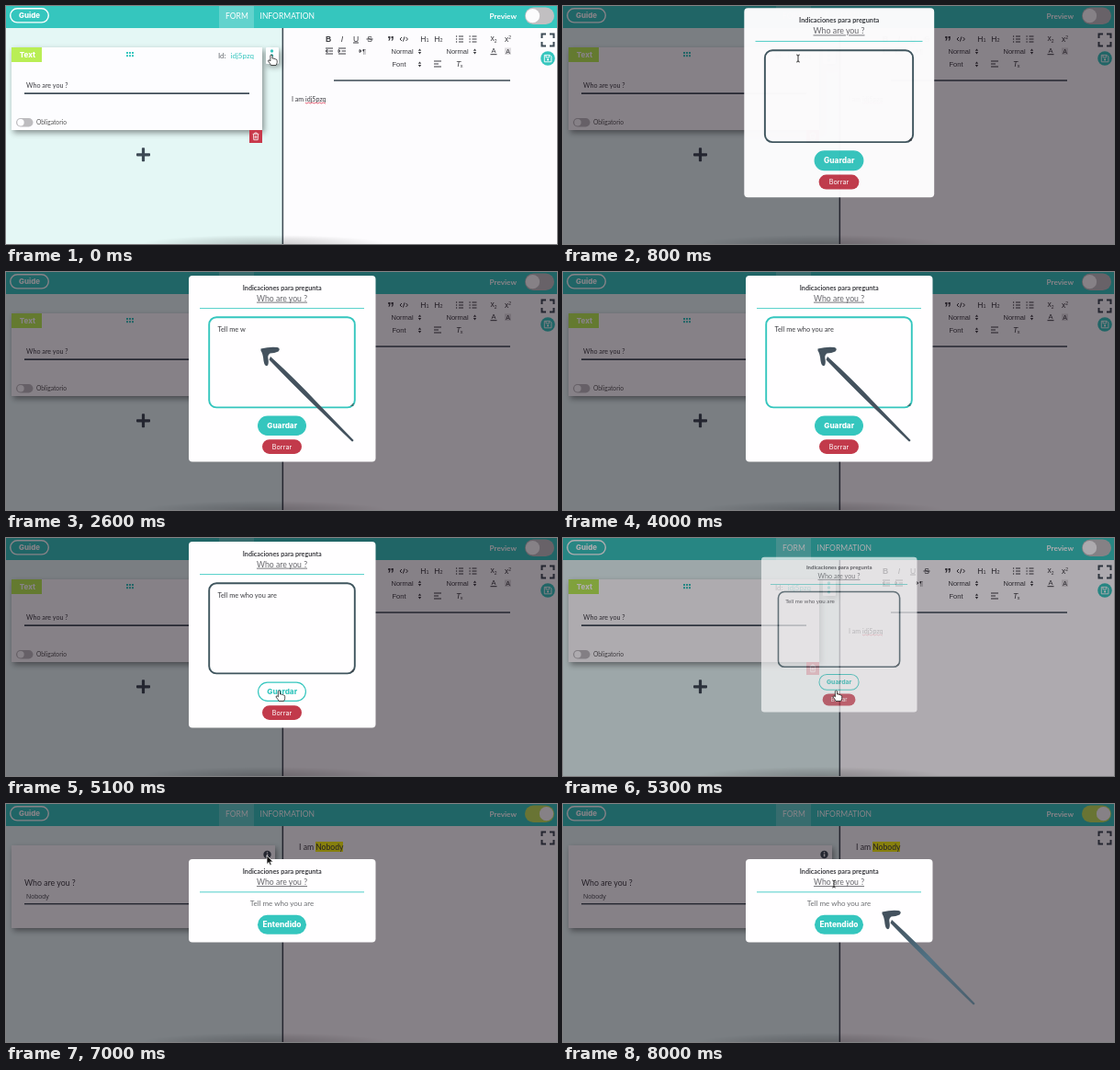
An HTML page for the animation above (8.1 s loop, 600 by 259 pixels).

```html
<!DOCTYPE html>
<html lang="en">
<head>
<meta charset="utf-8">
<title>Form editor hints</title>
<style>
html, body { margin: 0; width: 100%; height: 100%; overflow: hidden; background: #fdfcfe; }
svg { display: block; width: 100%; height: 100%; font-family: Lato, sans-serif; }
.card { fill: #fdfdff; filter: drop-shadow(2px 3px 3px rgba(0,0,0,.42)); }
.heavy { font-family: Inter, sans-serif; font-weight: 800; }
.plain { font-family: "Liberation Sans", Arial, sans-serif; }
.inter { font-family: Inter, sans-serif; }
.mid { text-anchor: middle; }
.ul { text-decoration: underline; text-decoration-thickness: .5px; }
.line { fill: none; stroke: #3b3b40; stroke-width: 1; }
</style>
</head>
<body>
<svg id="stage" viewBox="0 0 600 259" preserveAspectRatio="none"></svg>
<script>
const LOOP = 8100, STEP = 100;
const TEAL = '#35c6be', INK = '#3d4a55', DARK = '#3b3b40', RED = '#c23a4b';
const ANSWER = 'Tell me who you are';

const text = (x, y, size, str, fill = DARK, cls = '', extra = '') =>
  `<text x="${x}" y="${y}" font-size="${size}" fill="${fill}" class="${cls}" ${extra}>${str}</text>`;
const rect = (x, y, w, h, fill, r = 0, extra = '') =>
  `<rect x="${x}" y="${y}" width="${w}" height="${h}" rx="${r}" fill="${fill}" ${extra}/>`;
const dot = (x, y, r, fill, extra = '') =>
  `<circle cx="${x}" cy="${y}" r="${r}" fill="${fill}" ${extra}/>`;
const path = (d, extra = '') => `<path d="${d}" class="line" ${extra}/>`;
const group = (id, body) => `<g id="${id}">${body}</g>`;

const rows = (x, y, widths) =>
  widths.map((w, i) => path(`M${x} ${y + i * 3}h${w}`, 'stroke-width=".9"')).join('');
const listIcon = (x) => rows(x + 3, 33, [5, 5, 5]) +
  [33, 36, 39].map(y => dot(x + .6, y, .7, DARK)).join('');
const indentIcon = (x, side) => rows(x, 46, [8]) + rows(x + 3.5, 49, [4.5]) + rows(x, 52, [8]) +
  path(side > 0 ? `M${x} 47.5l2 1.5l-2 1.5z` : `M${x + 2} 47.5l-2 1.5l2 1.5z`, 'stroke-width=".6"');
const picker = (x, y, label, ax) => text(x, y, 7.5, label, DARK, 'plain') +
  `<path d="M${ax - 1.7} ${y - 3.3}h3.4l-1.7 -2.3zM${ax - 1.7} ${y - 1.9}h3.4l-1.7 2.3z" fill="${DARK}"/>`;

function toolbar() {
  const t = (x, y, s, extra = '', size = 8.6) => text(x, y, size, s, DARK, 'plain mid', extra);
  return t(351, 39, 'B', 'font-weight="700"') + t(366, 39, 'I', 'font-style="italic"') +
    t(381, 38.5, 'U') + path('M378 40h6', 'stroke-width=".8"') +
    t(396, 39, 'S') + path('M392.5 36h7', 'stroke-width=".7"') +
    t(419, 45, '”', 'font-weight="700"', 16) +
    path('M431 34l-2 2l2 2M435.5 34l2 2l-2 2M434 33.4l-1.6 5.2', 'stroke-width=".8"') +
    t(456, 39, 'H<tspan font-size="5.5">1</tspan>') + t(471, 39, 'H<tspan font-size="5.5">2</tspan>') +
    listIcon(490) + listIcon(504.5) +
    t(531, 38, 'x<tspan font-size="5" dy="1.5">2</tspan>') + t(546.5, 39, 'x<tspan font-size="5" dy="-3">2</tspan>') +
    indentIcon(348, -1) + indentIcon(362, 1) +
    path('M385 47.5l2 1.5l-2 1.5z', 'stroke-width=".6"') + t(390, 52, '¶', '', 7.5) +
    picker(419.5, 52, 'Normal', 450.5) + picker(479.5, 52, 'Normal', 510.5) +
    t(531, 51, 'A', '', 7.5) + path('M527.5 52.7h7') +
    rect(543, 45.5, 7, 7.5, '#dfdde0') + t(546.5, 52, 'A', '', 7) +
    picker(420.5, 66, 'Font', 450.5) +
    rows(466, 60, [8, 5, 8]) +
    t(492.5, 66, 'T', 'font-style="italic"') + t(496, 67, 'x', '', 5.5);
}

function editor() {
  const handle = [0, 1, 2, 3, 4, 5].map(i =>
    rect(131 + i % 3 * 3, 50 + (i > 2 ? 3.2 : 0), 2, 2, TEAL)).join('');
  let wave = 'M326 105';
  for (let i = 0; i < 11; i++) wave += `l1 ${i % 2 ? -1 : 1}l1 0`;
  return rect(6, 45, 273, 90, '#fff', 0, 'class="card"') +
    rect(6, 45, 33, 16, '#b9ee55') + text(23.5, 56, 8, 'Text', '#fff', 'heavy mid') + handle +
    text(231, 57, 8, 'Id:', '#666b70') + text(244.5, 57, 8, 'idj5pzq', TEAL) +
    rect(283, 45, 14, 18, '#fbfdfd', 1, 'class="card"') +
    [49, 54, 59].map(y => dot(289.5, y, 1.7, TEAL)).join('') +
    text(22, 89, 7.2, 'Who are you ?') + rect(20, 94.3, 245, 1.7, INK) +
    rect(11, 122, 18.5, 9.5, '#bdbcbf', 4.75) + dot(16, 126.7, 3.7, '#fdfdff') +
    text(33, 129, 6.7, 'Obligatorio', '#555') +
    rect(265, 135, 14, 14, '#c8394b') +
    `<path d="M268.7 139.3h6.6M270.8 139v-1h2.4v1M269.4 139.5l.4 6.2h4.4l.4 -6.2M271.2 141v3.3M272.8 141v3.3" fill="none" stroke="#fff" stroke-width=".8"/>` +
    rect(142, 160.2, 15, 3.2, INK, .8) + rect(147.9, 154.3, 3.2, 15, INK, .8) +
    toolbar() + rect(357, 80.3, 192, 1.5, INK) +
    text(311, 103.5, 7.1, 'I am idj5pzq') + `<path d="${wave}" fill="none" stroke="#e0405a" stroke-width=".8"/>` +
    dot(590, 57, 7.8, TEAL) +
    `<path d="M586.3 53.4h6l1.6 1.6v5.8h-7.6zM588 53.5v2.4h3.6v-2.4" fill="none" stroke="#fff" stroke-width=".9"/>` +
    dot(590.1, 58.4, 1.1, '#fff');
}

function preview() {
  return rect(6, 45, 287, 90, '#fff', 0, 'class="card"') +
    dot(284.5, 55, 4.2, INK) + rect(283.8, 54.3, 1.5, 3, '#fff') + dot(284.5, 52.8, .8, '#fff') +
    text(20, 89, 8.8, 'Who are you ?') + text(22, 102.5, 7.2, 'Nobody', '#55585c', 'plain') +
    rect(20, 108, 259, 1.4, INK) +
    rect(337, 41, 30, 11, '#fdf90f') + text(319, 50, 8.7, 'I am') + text(337.2, 50, 8.6, 'Nobody');
}

const heading = (y) =>
  text(300.7, y, 7.2, 'Indicaciones para pregunta', DARK, 'mid', 'font-weight="700"') +
  text(300.5, y + 12, 8.7, 'Who are you ?', '#66666b', 'mid ul') +
  rect(211, y + 19.3, 179, 1.1, '#5fd3cd');

const askBox = () => rect(199, 4, 203.5, 202.5, '#fffeff', 4) + heading(19.7) +
  `<rect id="field" x="221.2" y="49.2" width="158.6" height="98.2" rx="8" fill="#fffeff" stroke-width="1.9"/>` +
  path('M375.5 146l3 -3M377.3 146l1.2 -1.2', 'stroke-width=".5"') +
  `<text id="typed" x="230.5" y="64.7" font-size="7.4" fill="${DARK}"></text>` +
  `<rect id="save" x="274.6" y="157.1" width="51.8" height="20.3" rx="10.15" stroke="${TEAL}" stroke-width="1.2"/>` +
  `<text id="saveText" x="300.7" y="170.1" font-size="8.2" class="heavy mid">Guardar</text>` +
  rect(279, 182.3, 43, 15.6, RED, 7.8) + text(300.5, 192.7, 7.2, 'Borrar', '#fff', 'inter mid');

const tellBox = () => rect(199, 60, 203.5, 90.5, '#fffeff', 4) + heading(76) +
  text(300.5, 111, 8, ANSWER, '#6c6e72', 'mid') +
  rect(274, 120.8, 53, 21, TEAL, 10.5) + text(300.5, 134.2, 8.4, 'Entendido', '#fff', 'heavy mid');

// Brush arrow with its tip at the local origin and its tail at (100, 100)
const arrow = (id, fill) => `<g id="${id}">
  <path d="M10.5 8.5Q38 33.5 62 59.2L101 99.6Q100.6 101.4 99 100.8L58.5 61.8Q32 36 9 12Z" fill="${fill}"/>
  <path d="M0 0Q10 -2.5 18 -1.5Q22 0 19 3Q15 5 10 5Q7 7 8 11Q9 17 7 18.5Q4 19.5 3 13Q2.5 6 0 2Z" fill="#44525e"/></g>`;

const corner = (x, y, a, b) => `M${x} ${y + 4.5 * b}v${-4.5 * b}h${4.5 * a}`;

document.getElementById('stage').innerHTML = `
<defs>
  <radialGradient id="dock" cx=".5" cy="1" r=".5" gradientTransform="translate(0 -1) scale(1 2)">
    <stop offset="0" stop-opacity=".2"/><stop offset=".6" stop-opacity=".09"/><stop offset="1" stop-opacity="0"/>
  </radialGradient>
  <linearGradient id="steel" x1="0" y1="0" x2="1" y2="1">
    <stop offset="0" stop-color="#44525e"/><stop offset=".45" stop-color="#507183"/><stop offset="1" stop-color="#4b5f6d"/>
  </linearGradient>
</defs>` +
rect(0, 0, 600, 259, '#fdfcfe') + rect(0, 24, 301, 235, '#e4f7f5') +
rect(0, 0, 600, 24, TEAL) + rect(232, 0, 38, 24, '#62d3cd') +
rect(4.7, 2.7, 41.6, 15.2, 'none', 7.6, 'stroke="#fff" stroke-width="1.4"') +
text(25.5, 13.2, 7.9, 'Guide', '#fff', 'heavy mid') +
text(239, 13.7, 8.5, 'FORM', '#fff') + text(276.5, 13.7, 8.5, 'INFORMATION', '#fff') +
text(526.5, 13.7, 8.2, 'Preview', '#fff', '', 'font-weight="700"') +
rect(565, 1.5, 32, 18.5, '#c1bfc1', 9.25, 'id="track"') + dot(573.5, 10.7, 7.6, '#fcfcfd', 'id="knob"') +
rect(300.6, 24, 1.5, 235, '#3b4750') +
group('editor', editor()) + group('preview', preview()) +
path(corner(583.5, 30.5, 1, 1) + corner(596.5, 30.5, -1, 1) + corner(583.5, 43.5, 1, -1) + corner(596.5, 43.5, -1, -1),
  `style="stroke:${INK};stroke-width:2"`) +
rect(148, 249, 266, 10, 'url(#dock)') +
rect(0, 0, 600, 259, '#0b020c', 0, 'id="shade"') +
group('ask', askBox()) + group('tell', tellBox()) +
arrow('arrowA', '#44525e') + arrow('arrowB', 'url(#steel)') +
`<g id="hand"><path d="M-1.1 .2Q0 -1 1 .2V3.6Q2.2 3 3 4Q4.2 3.6 4.8 4.6Q6.2 4.4 6.2 6V8Q6 9.5 5 11H-.4Q-1.4 9-3.4 6.6Q-3.6 5-2.2 5.4L-1.1 6.4Z" fill="#fff" stroke="#222" stroke-width=".8"/></g>
<g id="point"><path d="M0 0V9.5L2.2 7.5L3.6 10.8L5.2 10.1L3.8 6.9H6.8Z" fill="#111" stroke="#fff" stroke-width=".7"/></g>
<g id="beam"><path d="M-1.8 -4Q0 -4 0 -2.7Q0 -4 1.8 -4M0 -3V3M-1.8 4Q0 4 0 2.7Q0 4 1.8 4" fill="none" stroke="#222" stroke-width=".9"/></g>`;

const el = {};
document.querySelectorAll('[id]').forEach(e => el[e.id] = e);

const clamp = v => Math.max(0, Math.min(1, v));
const span = (t, a, b) => clamp((t - a) / (b - a));
const ease = p => p * p * (3 - 2 * p);
const show = (e, on) => e.setAttribute('display', on ? 'inline' : 'none');
const set = (e, attrs) => { for (const k in attrs) e.setAttribute(k, attrs[k]); };

// Piecewise track of [time, value, value...] points
function track(points, t, curve = p => p) {
  let i = 0;
  while (i < points.length - 2 && t >= points[i + 1][0]) i++;
  const a = points[i], b = points[i + 1], p = curve(span(t, a[0], b[0]));
  return a.slice(1).map((v, k) => v + (b[k + 1] - v) * p);
}

const POP = [[0, .7], [.45, 1.05], [.8, .95], [1, 1]];
const MOVES = [[0, 289, 53.5], [600, 289, 53.5], [800, 256, 57], [1000, 254, 60], [1300, 248, 66],
  [4400, 262, 80], [4900, 297.5, 166.5], [5300, 297.5, 166.5], [5800, 587.5, 10.5],
  [6300, 587.5, 10.5], [6600, 284, 56], [7100, 284, 56], [7500, 295, 87], [8100, 295, 87]];
const CURSORS = [[0, 'hand'], [700, 'beam'], [1600, ''], [4300, 'beam'], [4700, 'hand'],
  [5350, 'point'], [5750, 'hand'], [6350, 'point'], [7200, 'beam']];

function modal(box, t, open, close) {
  const on = t >= open && t < close + 150;
  show(box, on);
  if (!on) return 0;
  const out = span(t, close, close + 150);
  const s = track(POP, span(t, open, open + 300))[0] * (1 - out / 2);
  set(box, {
    transform: `translate(300.7 105) scale(${s}) translate(-300.7 -105)`,
    opacity: (t < open + 300 ? .97 : 1) * (1 - out)
  });
  return span(t, open, open + 100) * (1 - out);
}

// Grows from the tail until the tip reaches (x, y)
function placeArrow(e, x, y, grow, alpha = 1) {
  const shift = 100 * (1 - grow);
  show(e, grow * alpha > 0);
  set(e, { transform: `translate(${x + shift} ${y + shift}) scale(${grow})`, opacity: alpha });
}

function draw(t) {
  const live = t >= 5900, slide = ease(span(t, 5800, 6000));
  show(el.editor, !live);
  show(el.preview, live);
  set(el.track, { fill: slide > .4 ? '#c3e35c' : '#c1bfc1' });
  set(el.knob, { cx: 573.5 + 15 * slide });

  const dim = Math.max(modal(el.ask, t, 630, 5250), modal(el.tell, t, 6690, LOOP));
  set(el.shade, { opacity: .49 * dim });

  const hover = t >= 4850;
  set(el.field, { stroke: t >= 1300 && !hover ? TEAL : '#3f555e' });
  set(el.save, { fill: hover ? '#fffeff' : TEAL });
  set(el.saveText, { fill: hover ? TEAL : '#fff' });
  el.typed.textContent = ANSWER.slice(0, Math.max(0, Math.floor((t - 1500) / 120)));

  placeArrow(el.arrowA, 277.5, 83.5, ease(span(t, 1900, 2300)), 1 - span(t, 4200, 4500));
  placeArrow(el.arrowB, 347.5, 117.5, ease(span(t, 7500, 7900)));

  const kind = CURSORS.filter(c => c[0] <= t).pop()[1];
  const [x, y] = track(MOVES, t, ease);
  for (const id of ['hand', 'point', 'beam']) {
    show(el[id], id === kind);
    set(el[id], { transform: `translate(${x} ${y})` });
  }
}

const start = performance.now();
function frame() {
  const t = (performance.now() - start) % LOOP;
  draw(Math.floor(t / STEP) * STEP);
  requestAnimationFrame(frame);
}
frame();
</script>
</body>
</html>
```
